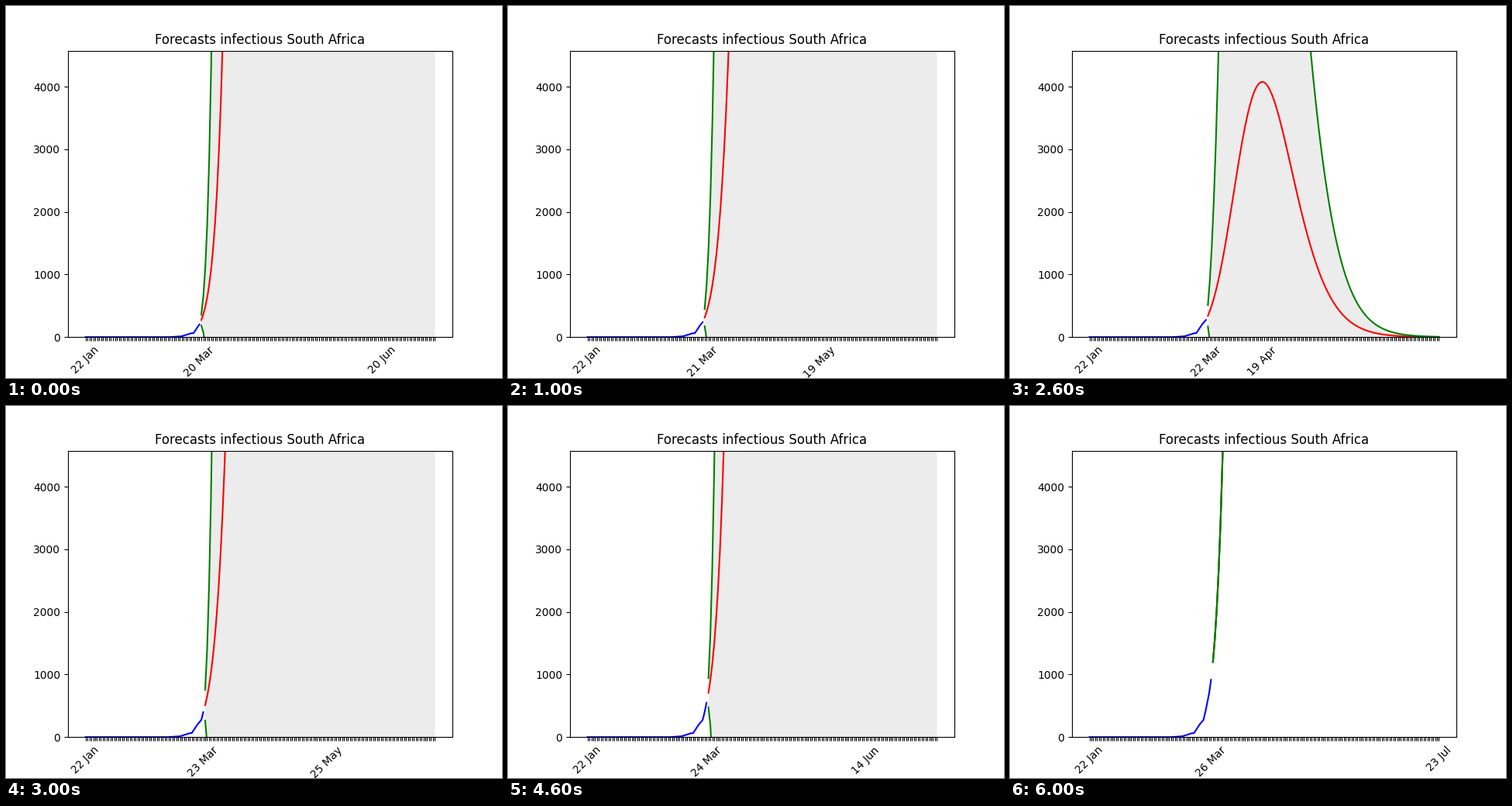
A matplotlib script that plays this animation: 640x480 px, repeating every 7000 ms.

```python
import numpy as np
import matplotlib.pyplot as plt
from matplotlib.animation import FuncAnimation

START = np.datetime64("2020-01-22")
FIRST_CUT = 58      # last observed day in the first forecast
HORIZON = 120       # forecast length in days
RECOVERY = 0.1224   # daily recovery rate
SETTLED = 54        # days after which the relative error stays constant
OFFSCREEN = 1e5

# Key points of the observed curve, joined by straight lines.
CASE_DAYS = [43, 49, 54, 55, 58, 60, 61, 63, 64]
CASE_COUNTS = [0, 13, 62, 62, 202, 274, 398, 697, 915]

# One fit per day: initial growth rate, days until the peak, error scale.
FITS = [
    (0.296, 93, 0.327),
    (0.269, 60, 0.457),
    (0.2245, 29, 0.539),
    (0.250, 64, 0.500),
    (0.260, 83, 0.337),
    (0.278, 120, np.nan),
    (0.273, 120, 0),
]


def observed(days):
    return np.interp(days, CASE_DAYS, CASE_COUNTS)


def date_label(day):
    return (START + day).astype(object).strftime("%d %b")


def forecast(t, initial, growth, peak, scale):
    """Epidemic with a fading contact rate: mean, lower and upper bound."""
    contact = RECOVERY + growth
    fade = np.log(contact / RECOVERY) / peak
    mean = initial * np.exp(contact / fade * (1 - np.exp(-fade * t))
                            - RECOVERY * t)
    s = np.minimum(t, SETTLED)
    error = mean * scale * s ** 1.32 * np.exp(-2 * fade * s)
    return [np.clip(y, -OFFSCREEN, OFFSCREEN)
            for y in (mean, mean - error, mean + error)]


fig, ax = plt.subplots(figsize=(6.4, 4.8), dpi=100)


def draw(i):
    ax.clear()
    growth, peak, scale = FITS[i]
    cut = FIRST_CUT + i
    last = cut + HORIZON
    past = np.arange(cut + 1)
    t = np.arange(1, HORIZON + 1)
    mean, lower, upper = forecast(t, observed(cut), growth, peak, scale)

    ax.plot(past, observed(past), color="blue")
    ax.plot(cut + t, mean, color="red")
    ax.fill_between(cut + t, lower, upper, color="gray", alpha=0.15,
                    linewidth=0)
    for bound in (lower, upper):
        ax.plot(cut + t, bound, color="green")

    # the peak is dated by the day before its tick
    labels = [""] * (last + 1)
    labels[0] = date_label(0)
    labels[cut] = date_label(cut)
    labels[cut + peak] = date_label(cut + peak - 1)
    ax.set_xticks(range(last + 1), labels, rotation=45)
    ax.set_xlim(-0.05 * last, 1.05 * last)
    ax.set_ylim(0, 5 * CASE_COUNTS[-1])
    ax.set_title("Forecasts infectious South Africa")
    return []


anim = FuncAnimation(fig, draw, frames=len(FITS), interval=1000,
                     init_func=lambda: [], repeat=True, repeat_delay=0)
plt.show()
```
